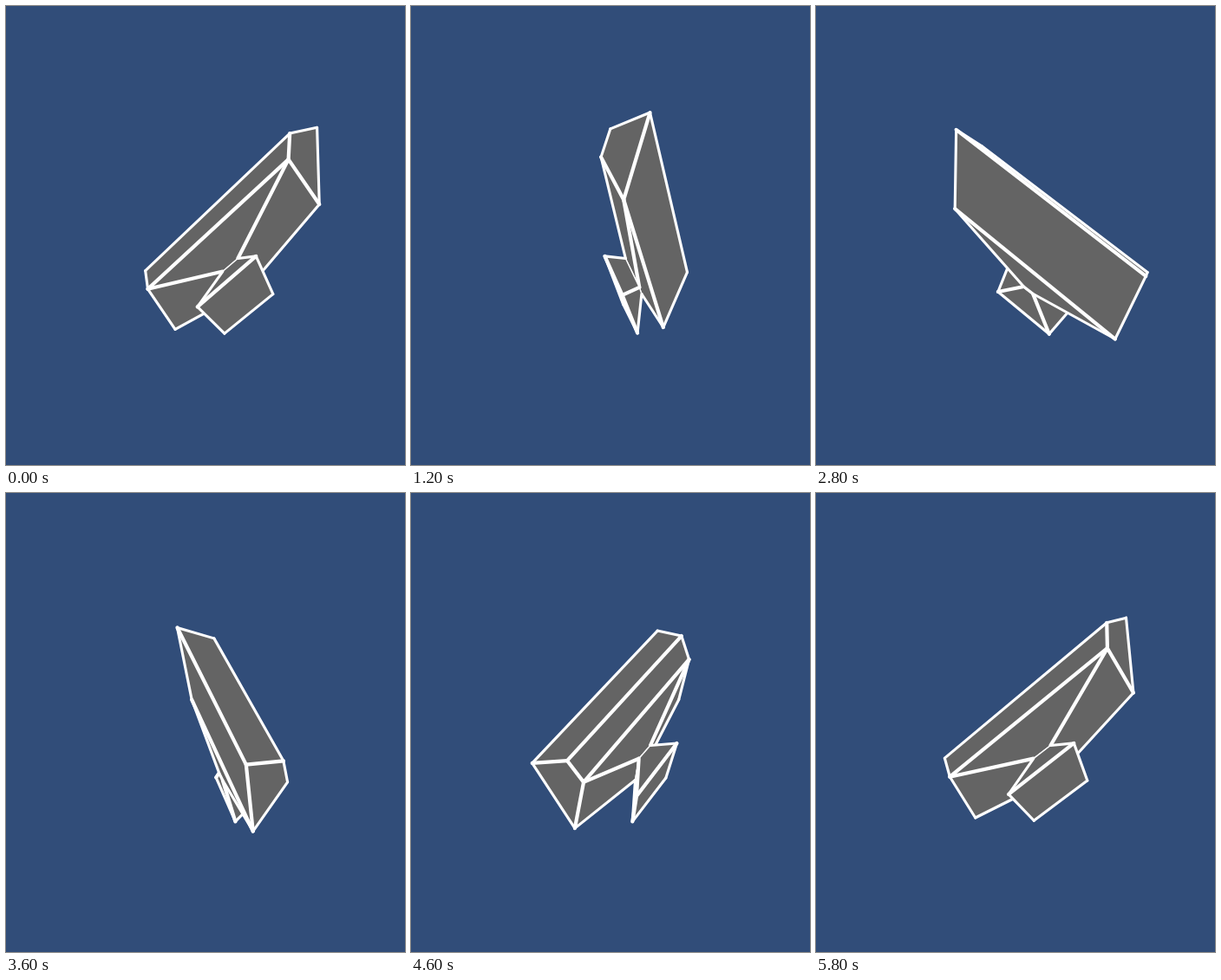
Recreate the animation shown at these times as an HTML page with a canvas. Size 460 px wide and 530 px high, loop 6000 ms.

```html
<!DOCTYPE html>
<html lang="en">
<head>
<meta charset="utf-8">
<title>Turning solid</title>
<style>
  html, body { margin: 0; width: 100%; height: 100%; overflow: hidden; background: #314d79; }
  canvas { display: block; }
</style>
</head>
<body>
<canvas id="stage" width="460" height="530"></canvas>
<script>
const ctx = document.getElementById('stage').getContext('2d');
const AXIS_X = 260, EYE_Y = 291, DISTANCE = 797;
const STEP_MS = 200, STEPS = 30;

// Corners as [radius, angle in degrees, height], height pointing down.
const corners = {
  A: [80, 38, -135],    B: [98, 10, -147.5],
  C: [105.5, 25, -58.5], D: [84.5, 44, -105.5],
  E: [122, 209, 15.8],  F: [110.5, 203, 37.7],
  G: [91, 220, 88.5],   H: [134, 228, 18.8],
  T: [17, 65, 0.5],     U: [10.8, 160, 15.5],
  V: [20.5, 9, 33],     W: [11, -14, 41],
  P: [52.5, 59.5, -2],  Q: [55.5, 34, 40],
  R: [9, 205, 87.5],    S: [39.3, 174, 56]
};

// Faces run clockwise when seen from outside.
const body = ['BHGC', 'CGWV', 'ADFE', 'DTUF', 'BAEH', 'ABCD', 'HEFG', 'DCVT', 'FUWG'];
const foot = ['PQRS', 'TPSU', 'VWRQ', 'VQPT', 'RWUS'];
const neck = 'TVWU';

function project([radius, angle, height], turn) {
  const a = (angle + turn) * Math.PI / 180;
  const scale = 1 / (1 - radius * Math.sin(a) / DISTANCE);
  return [AXIS_X + radius * Math.cos(a) * scale, EYE_Y + height * scale];
}

function facesViewer(face, pts) {
  let area = 0;
  for (let i = 0; i < face.length; i++) {
    const [x1, y1] = pts[face[i]];
    const [x2, y2] = pts[face[(i + 1) % face.length]];
    area += x1 * y2 - x2 * y1;
  }
  return area > 0;
}

function drawPiece(faces, pts, thinNeck) {
  const edges = new Map();
  ctx.fillStyle = '#646464';
  for (const face of faces.filter(f => facesViewer(f, pts))) {
    ctx.beginPath();
    for (const c of face) ctx.lineTo(...pts[c]);
    ctx.fill();
    for (let i = 0; i < face.length; i++) {
      const key = [face[i], face[(i + 1) % face.length]].sort().join('');
      edges.set(key, (edges.get(key) || 0) + 1);
    }
  }
  // Inner edges are heavier than the outline.
  ctx.strokeStyle = '#fff';
  ctx.lineCap = 'round';
  for (const [[a, b], count] of edges) {
    const onNeck = neck.includes(a) && neck.includes(b);
    ctx.lineWidth = thinNeck && onNeck ? 1.4 : count > 1 ? 4.2 : 3.1;
    ctx.beginPath();
    ctx.moveTo(...pts[a]);
    ctx.lineTo(...pts[b]);
    ctx.stroke();
  }
}

function draw(turn) {
  const pts = {};
  for (const name in corners) pts[name] = project(corners[name], turn);
  ctx.fillStyle = '#314d79';
  ctx.fillRect(0, 0, 460, 530);
  const footInFront = facesViewer(neck, pts);
  if (footInFront) {
    drawPiece(body, pts, true);
    drawPiece(foot, pts, true);
  } else {
    drawPiece(foot, pts, false);
    drawPiece(body, pts, false);
  }
}

const start = performance.now();
function tick() {
  const step = Math.floor((performance.now() - start) / STEP_MS) % STEPS;
  draw(step * 360 / STEPS);
  requestAnimationFrame(tick);
}
tick();
</script>
</body>
</html>
```
